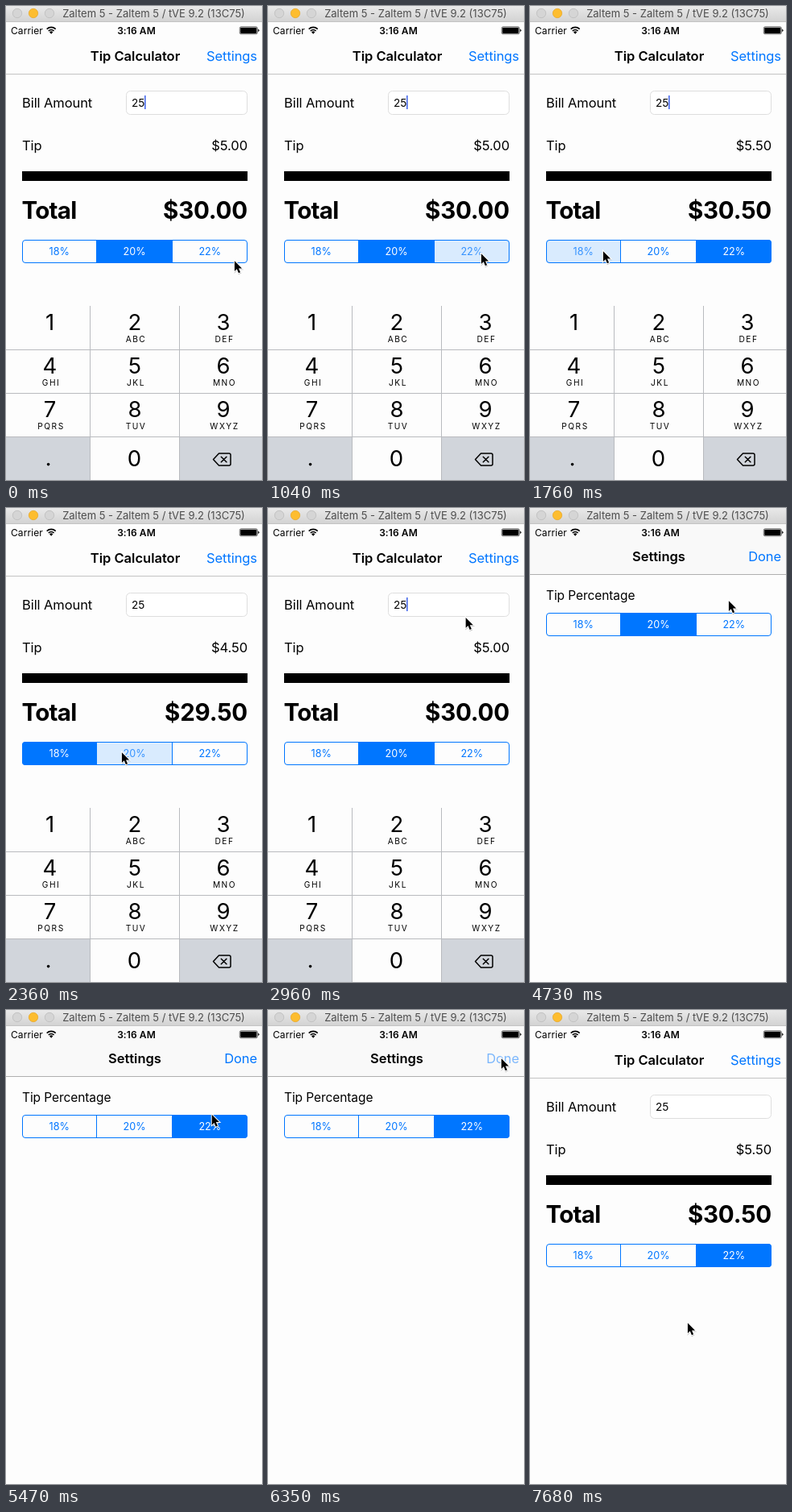
An HTML page that plays this animation: 318x588 px, repeating every 8000 ms.

```html
<!DOCTYPE html>
<html lang="en">
<head>
<meta charset="utf-8">
<title>Tip Calculator</title>
<style>
  html, body { margin: 0; width: 100%; height: 100%; overflow: hidden; background: #fdfdfd; }
  svg { display: block; width: 100vw; height: 100vh; }
  text { font: 400 16.5px Inter, "Open Sans", sans-serif; letter-spacing: -.08px; }
  .mid { text-anchor: middle; }
  .end { text-anchor: end; }
  .blue { fill: #0076ff; }
  .paper { fill: #fdfdfd; }
  .title { font-weight: 600; letter-spacing: 0; }
  .big { font-size: 29.5px; font-weight: 700; letter-spacing: -.2px; }
  .total { letter-spacing: -.7px; }
  .seg text { font-size: 12.6px; letter-spacing: 0; }
  .digit { font-size: 27.5px; letter-spacing: 0; }
  .letters { font-size: 10.2px; letter-spacing: 1.5px; }
  .status { font-size: 12px; letter-spacing: .1px; }
  .window { font-size: 13px; letter-spacing: 0; fill: #4d4d4d; }
</style>
</head>
<body>
<svg viewBox="0 0 318 588" xmlns="http://www.w3.org/2000/svg">
  <defs>
    <linearGradient id="chrome" x2="0" y2="1">
      <stop offset="0" stop-color="#e9e9e9"/><stop offset="1" stop-color="#d2d2d2"/>
    </linearGradient>
    <clipPath id="round"><rect x="20" width="280" height="29" rx="4"/></clipPath>
    <path id="arrow" d="M0 0V12.8L2.9 10.1 5 15 7.2 14 5.1 9.2H9.2Z"/>
  </defs>

  <g id="main">
    <rect class="paper" width="318" height="588"/>
    <rect y="84" width="318" height="1" fill="#c4c4c4"/>
    <text class="title mid" x="160.5" y="68">Tip Calculator</text>
    <text class="blue end" id="open" x="312" y="68">Settings</text>
    <text x="20" y="126">Bill Amount</text>
    <rect x="149.5" y="105.5" width="150" height="29" rx="5" fill="#fff" stroke="#dedede"/>
    <text x="156" y="125" style="font-size:13.6px">25</text>
    <rect id="caret" x="172" y="111" width="1.6" height="17" fill="#4669ec"/>
    <text x="20" y="179">Tip</text>
    <text class="end" id="tip" x="300" y="179"></text>
    <rect x="20" y="205" width="280" height="12"/>
    <text class="big total" x="19.5" y="264">Total</text>
    <text class="big end" id="total" x="300" y="264"></text>
    <g class="seg" id="rate" transform="translate(0 290)"></g>
  </g>

  <g id="sheet">
    <rect class="paper" y="20" width="318" height="568"/>
    <rect y="20" width="318" height="62" fill="#f9f9f9"/>
    <rect y="82" width="318" height="1" fill="#b0b0b0"/>
    <text class="title mid" x="160" y="66">Settings</text>
    <text class="blue end" id="close" x="312" y="66">Done</text>
    <text x="20" y="114" style="font-size:15.5px">Tip Percentage</text>
    <g class="seg" id="preset" transform="translate(0 130)"></g>
  </g>

  <g id="keypad"></g>

  <g id="status">
    <text class="status" x="6" y="34.5">Carrier</text>
    <path d="M50.7 28.6a8 8 0 0 1 11 0M52.8 31a5 5 0 0 1 6.8 0" fill="none" stroke="#000" stroke-width="1.7"/>
    <path d="M54 32.3a3.3 3.3 0 0 1 4.4 0L56.2 34.8Z"/>
    <text class="status mid" x="162" y="34.5" style="font-weight:600">3:16 AM</text>
    <rect x="290.3" y="25.8" width="22" height="9" rx="1.8" fill="none" stroke="#000" stroke-width=".6"/>
    <rect x="291.2" y="26.7" width="20.2" height="7.2" rx=".8"/>
    <path d="M313.2 28.6v3.5q1.3-.4 1.3-1.75t-1.3-1.75"/>
  </g>

  <g id="window">
    <rect width="318" height="20" fill="url(#chrome)"/>
    <rect y="19.3" width="318" height=".7" fill="#bdbdbd"/>
    <circle cx="14" cy="9" r="5.7" fill="#d5d5d5" stroke="#c3c3c3"/>
    <circle cx="34" cy="9" r="5.7" fill="#fdbd2f" stroke="#e5a524" stroke-width=".7"/>
    <circle cx="54" cy="9" r="5.7" fill="#d5d5d5" stroke="#c3c3c3"/>
    <text class="window mid" x="183.5" y="14">Zaltem 5 - Zaltem 5 / tVE 9.2 (13C75)</text>
  </g>

  <g id="cursor">
    <use href="#arrow" x="1.2" y="2.2" opacity=".25" stroke="#000" stroke-width="1.5"/>
    <use href="#arrow" x=".9" y="1.2" stroke="#fff" stroke-width="2"/>
    <use href="#arrow" x=".9" y="1.2"/>
  </g>
</svg>
<script>
const LOOP = 8000, STEP = 148, LEAD = 16;
const BILL = 25, RATES = [18, 20, 22], DEFAULT = 1;
const BLUE = '#0076ff', PAPER = '#fdfdfd';
const $ = id => document.getElementById(id);

const MOVES = [
  { from: 0, to: 5, x: 264, y: 306 },
  { from: 8, to: 12, x: 90, y: 303 },
  { from: 13, to: 16, x: 143, y: 302 },
  { from: 17, to: 22, x: 300, y: 44 },
  { from: 22, to: 24, x: 278, y: 65 },
  { from: 29, to: 32, x: 246, y: 114 },
  { from: 32, to: 35, x: 247, y: 146 },
  { from: 36, to: 40, x: 297, y: 35 },
  { from: 40, to: 41, x: 289, y: 59 },
  { from: 47, to: 49, x: 203, y: 322 },
  { from: 50, to: 52, x: 195, y: 387 }
];
const CLICKS = [
  { on: 'rate', pick: 2, down: 7, up: 8 },
  { on: 'rate', pick: 0, down: 12, up: 13 },
  { on: 'rate', pick: 1, down: 16, up: 17 },
  { on: 'preset', pick: 2, down: 35, up: 36 }
];
const OPEN = { down: 26, up: 28, dim: .2 };
const CLOSE = { down: 42, up: 44, dim: .5 };

const clamp = p => Math.min(1, Math.max(0, p));
const smooth = p => p * p * (3 - 2 * p);
const easeOut = p => 1 - (1 - p) ** 3;
const held = (press, n) => n >= press.down && n < press.up;

function pointer(n) {
  let x = 283, y = 315;
  for (const m of MOVES) {
    const p = smooth(clamp((n - m.from) / (m.to - m.from)));
    x += (m.x - x) * p;
    y += (m.y - y) * p;
  }
  return [x, y];
}

function choice(id, n) {
  const clicks = CLICKS.filter(c => c.on === id);
  return {
    selected: clicks.findLast(c => n >= c.up)?.pick ?? DEFAULT,
    pressed: clicks.find(c => held(c, n))?.pick
  };
}

function buildSegments(group) {
  const edges = [20, 112.5, 206.5, 300];
  const cells = RATES.map((r, i) =>
    `<rect x="${edges[i]}" width="${edges[i + 1] - edges[i]}" height="29"/>`).join('');
  const labels = RATES.map((r, i) =>
    `<text class="mid" x="${(edges[i] + edges[i + 1]) / 2}" y="19">${r}%</text>`).join('');
  group.innerHTML = `<g clip-path="url(#round)">${cells}</g>
    <path d="M112.5 0V29M206.5 0V29" stroke="${BLUE}"/>
    <rect x="20.5" y=".5" width="279" height="28" rx="3.5" fill="none" stroke="${BLUE}"/>${labels}`;
}

function paintSegments(group, { selected, pressed }) {
  const cells = group.querySelectorAll('g rect');
  group.querySelectorAll('text').forEach((label, i) => {
    cells[i].setAttribute('fill', i === selected ? BLUE : i === pressed ? '#d9ebfe' : PAPER);
    label.setAttribute('fill', i === selected ? '#fff' : BLUE);
    label.setAttribute('opacity', i === pressed ? .75 : 1);
  });
}

function buildKeypad() {
  const words = ['', 'ABC', 'DEF', 'GHI', 'JKL', 'MNO', 'PQRS', 'TUV', 'WXYZ'];
  const keys = words.map((word, i) => {
    const x = [54.5, 160, 270][i % 3], y = 402 + 54 * Math.floor(i / 3);
    return `<text class="digit mid" x="${x}" y="${y}">${i + 1}</text>
      <text class="letters mid" x="${x + 1.5}" y="${y + 15}">${word}</text>`;
  }).join('');
  $('keypad').innerHTML = `<rect class="paper" y="372" width="318" height="216"/>
    <path d="M0 535H104V588H0ZM216 535H318V588H216Z" fill="#d1d5db"/>
    <path d="M104.5 372V588M215.5 372V588M0 426.5H318M0 480.5H318M0 534.5H318" stroke="#b9bbbf"/>
    ${keys}
    <text class="digit mid" x="159.5" y="571">0</text>
    <circle cx="52.6" cy="568.6" r="1.8"/>
    <g fill="none" stroke="#000" stroke-width="1.5" stroke-linejoin="round" stroke-linecap="round">
      <path d="M257.5 562.5L264.5 555H277Q279 555 279 557V568Q279 570 277 570H264.5Z"/>
      <path d="M267.3 559.2l6.6 6.6M273.9 559.2l-6.6 6.6"/>
    </g>`;
}

function shift(id, x, y) {
  $(id).setAttribute('transform', `translate(${x} ${y})`);
}

function draw(t) {
  const n = Math.floor((t + LEAD) / STEP);
  const rate = choice('rate', n), preset = choice('preset', n);
  if (n >= CLOSE.up) rate.selected = preset.selected;

  const tip = BILL * RATES[rate.selected] / 100;
  $('tip').textContent = '$' + tip.toFixed(2);
  $('total').textContent = '$' + (BILL + tip).toFixed(2);
  paintSegments($('rate'), rate);
  paintSegments($('preset'), preset);
  $('open').setAttribute('opacity', held(OPEN, n) ? OPEN.dim : 1);
  $('close').setAttribute('opacity', held(CLOSE, n) ? CLOSE.dim : 1);

  const blink = Math.max(0, n * STEP - LEAD) % 1000;
  const lit = n < OPEN.up && (blink < 130 || blink >= 530);
  $('caret').setAttribute('visibility', lit ? 'visible' : 'hidden');

  // The sheet rises as the keypad drops; closing moves only the sheet.
  const rise = easeOut(clamp((n - OPEN.up + 1) / 4));
  const fall = smooth(clamp((n - CLOSE.up + 1) / 2));
  shift('sheet', 0, 568 * (1 - rise + fall));
  shift('keypad', 0, 216 * rise);
  shift('cursor', ...pointer(n));
}

buildSegments($('rate'));
buildSegments($('preset'));
buildKeypad();
const start = performance.now();
function tick() {
  draw((performance.now() - start) % LOOP);
  requestAnimationFrame(tick);
}
draw(0);
requestAnimationFrame(tick);
</script>
</body>
</html>
```
